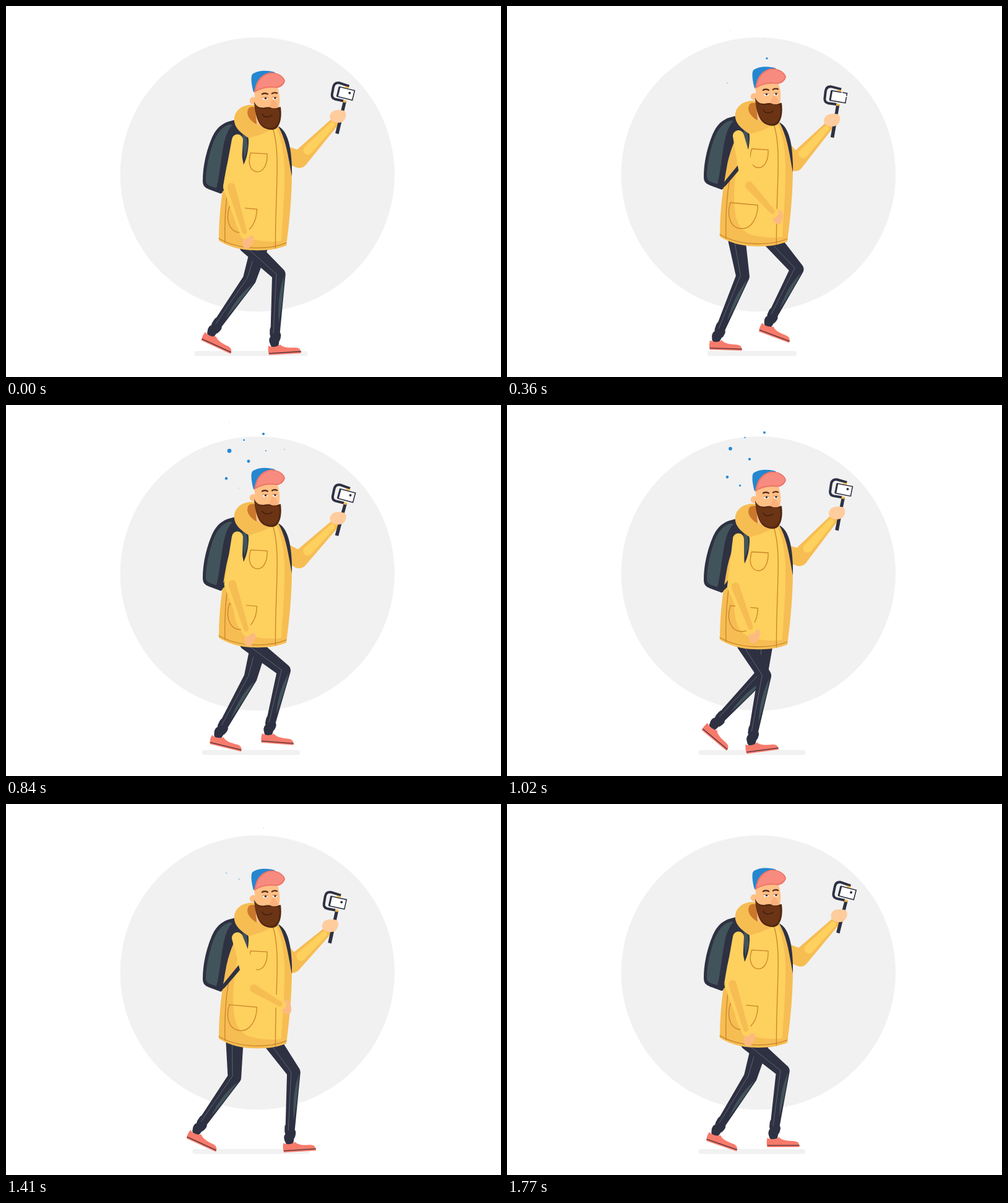
Recreate the animation shown at these times as an HTML page. Size 800x600 px, loop 1800 ms.

```html
<!DOCTYPE html>
<html lang="en">
<head>
<meta charset="utf-8">
<title>Walking vlogger</title>
<style>
  html, body { margin: 0; width: 100%; height: 100%; overflow: hidden; background: #fff; }
  svg { display: block; width: 100vw; height: 100vh; }
  .ink { fill: #2e3142; }
  .teal { fill: #42545b; }
  .sun { fill: #fed05d; }
  .amber { fill: #f6bd53; }
  .skin { fill: #ffc086; }
  .stitch { fill: none; stroke: #c9842a; stroke-width: 1.3; stroke-linecap: round; }
  .seam { fill: none; stroke: #68717b; stroke-width: .8; }
  .bracket { fill: none; stroke: #2e3142; stroke-width: 4; stroke-linejoin: round; }
</style>
</head>
<body>
<svg viewBox="0 0 800 600">
  <defs>
    <g id="shoe">
      <path fill="#f77b6c" d="M-10 3C-4 6 3 6 9 2C14 8 24 8 34 8.500C40 9.500 42 12 42 18H-10C-11.500 12-11 7-10 3Z"/>
      <path d="M-10 15.300H42" stroke="#4a2f38" stroke-width="1.3"/>
    </g>
  </defs>

  <circle cx="406.3" cy="272.5" r="221.7" fill="#f1f1f1"/>
  <rect id="ground" y="558" height="8" rx="4" fill="#f1f1f1"/>
  <g id="dots" fill="#2389d7"></g>

  <path id="farArm" class="amber"/>
  <path id="farLight" class="sun"/>
  <g id="camera">
    <path class="ink" d="M541 151L546 152L534.500 205L529 203.500Z"/>
    <path class="bracket" d="M550 127L534 122Q526 121 524.500 129L522.500 141Q522 147 528 148.500L541 151"/>
    <path d="M534.500 128.500L559 134L555.500 149.500L531 144Z" fill="#fff" stroke="#2e3142" stroke-width="1.6"/>
    <path d="M534.500 128.500L531 144" stroke="#2e3142" stroke-width="3"/>
    <circle class="ink" cx="551" cy="138" r="2"/>
    <path d="M544 127L550 128.500L549.500 131L543.500 129.500ZM541 149.500L546 150.500L545 154L540.500 153Z" fill="#f5b93f"/>
    <path id="flash" d="M0-10L2-2L10 0L2 2L0 10L-2 2L-10 0L-2-2Z" fill="#fff"/>
    <path d="M521 172C524 165 535 165 543 167C548 171 546 181 540 185C533 188 524 186 521 182C519 178 519 175 521 172Z" fill="#ffcc9d"/>
  </g>

  <g id="legB"></g>
  <g id="legA"></g>

  <g id="torso">
    <path class="ink" d="M380 183C356 184 342 192 333 212C324 233 318 258 318 282C318 290 321 293 328 296L347 303L352 300C375 270 392 230 392 212Z"/>
    <path class="teal" d="M362 191C348 194 339 208 333 226C327 245 323 265 323 281C323 287 326 289 331 291L340 294C344 280 347 250 351 228C354 212 358 200 366 192Z"/>
    <path class="amber" d="M384 203C370 212 361 240 356 262C349 300 344 335 344 379C362 390 380 394 400 394.500C420 395.500 438 393 453 387C458 350 462 310 462 268C461 235 455 208 440 194L405 190Z"/>
    <path class="sun" d="M385 203C372 250 364 300 368 335C371 366 385 376 410 379C425 381 440 381 445 379C447 340 451 300 450 262C449 235 446 215 436 194L410 190Z"/>
    <path class="stitch" d="M431 197C437 215 439 245 438 275C437 320 435 350 435.500 391M344 375.500C362 386 382 390 402 390.500C422 391 440 388 453 382.500M360 285C355 315 353 350 354 382"/>
    <path class="stitch" d="M395.500 237L422 238.500C423 255 416 267.500 407 267.500C395 267.500 390 254 395.500 237Z"/>
    <path class="stitch" d="M361 324L405.500 328C405 350 394 366 380 366C362 366 354 347 361 324Z"/>
    <path class="ink" d="M440 194C455 201 463 228 462 275C457 250 454 218 440 194Z"/>
    <path class="ink" d="M346 303L349 293L376 260L378 268L354 296ZM372 186C386 189 393 205 392 222C391 238 388 248 384 256L380 235L377 208Z"/>
    <path class="teal" d="M382 198C390 207 391 222 390 230L385 247L383 225Z"/>
  </g>

  <path id="nearHand" fill="#fdba80" d="M-11-7C-6-11 1-10 8-6C13-3 13 2 9 5C3 9-5 9-10 5Z"/>
  <path id="nearArm" class="sun"/>
  <path id="nearShade" class="amber"/>

  <g id="head">
    <path class="amber" d="M404 160C390 157 372 163 369 180C367 196 380 205 392 213C401 211 414 207 428 200L412 184Z"/>
    <path fill="#cb782c" d="M392 165C387 173 392 184 405 191L408 166C403 162 396 161 392 165Z"/>
    <path class="skin" d="M403 165L405 190L414 194L420 170Z"/>
    <path class="skin" d="M401 133L438 129C442 140 443 150 442 158L440 170L404 168Z"/>
    <circle class="skin" cx="399.500" cy="152.500" r="5.800"/>
    <path fill="#51270f" d="M401 154C404 161 408 164 416 164C424 162 430 163 436 165C440 164 443 162 444 163C446 178 444 192 436 198C429 202 416 199 410 190C405 182 402 170 401 154Z"/>
    <path fill="#6b3415" d="M402 158C406 165 411 166 417 166C428 164 434 167 441 166C443 180 441 190 434 195C427 199 417 196 411 188C406 181 403 170 402 158Z"/>
    <path d="M414 174C417 180 425 180 430 176" fill="none" stroke="#42200f" stroke-width="1.6" stroke-linecap="round"/>
    <path fill="#fbb07c" d="M430 151C434 152 440 157 439 162C437 166 428 166 426 162C426 158 429 156 430 151Z"/>
    <g fill="#fff"><ellipse cx="419" cy="149" rx="4" ry="2.200"/><ellipse cx="434.500" cy="148.500" rx="3.600" ry="2.200"/></g>
    <g fill="#3a2116"><circle cx="419.500" cy="148.600" r="1.800"/><circle cx="435" cy="148.100" r="1.800"/></g>
    <path d="M414.500 147.300H423.500M430.500 146.800H438.500" stroke="#b9784c" stroke-width="1"/>
    <path d="M414 142Q418 139.500 423 142M430 141Q434 138.500 438 140.500" fill="none" stroke="#5a2d18" stroke-width="2.400" stroke-linecap="round"/>
    <path fill="#2487d0" d="M400 139C397 128 395 114 398 110C406 103 425 103 435 107L418 118Z"/>
    <path fill="#ef7568" d="M401 140C403 124 409 112 424 107.500C437 105 450 113 451 121C449 128 443 132 437 132C424 130 410 133 401 140Z"/>
    <path fill="#f88b7f" d="M404 136C406 123 412 114 425 109C437 107 448 114 449 121C446 128 440 130 436 130C424 128 412 131 404 136Z"/>
  </g>
</svg>

<script>
const FRAME = 30, LOOP = 60, STRIDE = 30;
const STANCE = 1.2; // share of the 2 half-turns that a foot spends on the ground
const $ = id => document.getElementById(id);
const put = (el, name, value) => el.setAttribute(name, value);

// Phases count half-turns: one stride is 2.
const wave = (phase, mean, swing, peak = 0, rate = 1) =>
  mean + swing * Math.cos(Math.PI * rate * (phase - peak));
const easeOut = u => 1 - (1 - u) ** 1.5;

// The first step of a stride takes a little longer than the second.
function stridePhase(step) {
  const even = 2 * step / STRIDE;
  return even - .07 * (1 - Math.cos(Math.PI * even));
}

// Point at fraction f of a bone, pushed sideways.
function along([ax, ay], [bx, by], f, side = 0) {
  const dx = bx - ax, dy = by - ay, len = Math.hypot(dx, dy) || 1;
  return [ax + dx * f - dy / len * side, ay + dy * f + dx / len * side];
}

// Tapered bone with round ends.
function bone(a, ra, b, rb) {
  return `M${along(a, b, 0, ra)}L${along(a, b, 1, rb)}A${rb} ${rb} 0 0 0 ${along(a, b, 1, -rb)}` +
    `L${along(a, b, 0, -ra)}A${ra} ${ra} 0 0 0 ${along(a, b, 0, ra)}Z`;
}

// The foot slides back on the ground, then swings forward through the air.
function footPath(phase) {
  if (phase < STANCE) {
    const u = phase / STANCE;
    return [434 - 135 * easeOut(u), 546 - 25 * u * u];
  }
  const v = (phase - STANCE) / (2 - STANCE);
  return [299 + 135 * easeOut(v), 521 + 24 * v - 23 * Math.sin(Math.PI * v)];
}

function drawLeg(id, phase, hipX, shift, lift) {
  const [footX, footY] = footPath(phase);
  const hip = [wave(phase, hipX, 11, 1.9), 386 + lift];
  const knee = [shift + wave(phase, 407, 39, 1.87) + wave(phase, 0, 6, .7, 2),
    lift + wave(phase, 437.5, 6, .75)];
  const ankle = [shift + footX, footY];
  const angle = wave(phase, 13, 24, 1.3) + wave(phase, 0, 4, .35, 2);

  const cuff = (f, side) => {
    const p = along(knee, ankle, f, side);
    return bone(p, 8, along(p, ankle, .3), 8);
  };
  const [shape, shine, seam, shoe] = $(id).children;
  put(shape, "d", bone(hip, 14, knee, 10.8) + bone(knee, 10.8, ankle, 7) +
    cuff(.8, 1) + cuff(.88, -1.5) + cuff(.95, 1));
  put(shine, "d", `M${along(knee, ankle, .02, -8.5)}Q${along(knee, ankle, .3, -9.5)} ${along(knee, ankle, .7, -5)}` +
    `Q${along(knee, ankle, .32, 1)} ${along(knee, ankle, .02, -8.5)}Z`);
  put(seam, "d", `M${along(hip, knee, 0, 4)}L${along(knee, ankle, 0, 4)}L${along(knee, ankle, .85, 3)}`);
  put(shoe, "transform", `translate(${ankle}) rotate(${angle})`);
}

function drawNearArm(phase, lift) {
  const shoulder = [374, 216 + lift];
  const elbow = [wave(phase, 383, 18, 1), lift + wave(phase, 294.5, 2.5, 1)];
  const hand = [wave(phase, 421, 31, 1), wave(phase, 355, 26)];
  const angle = Math.atan2(hand[1] - elbow[1], hand[0] - elbow[0]) * 180 / Math.PI;
  put($("nearArm"), "d", bone(shoulder, 9, elbow, 14) + bone(elbow, 14, along(elbow, hand, .86), 8));
  put($("nearShade"), "d", bone(along(elbow, hand, 0, 1), 6.5, along(elbow, hand, .82), 4));
  put($("nearHand"), "transform", `translate(${hand}) rotate(${angle + 30})`);
}

function drawFarArm(phase, lift, frame) {
  const elbow = [wave(phase, 468.5, 5.5), wave(phase, 253.5, 7, 1.2)];
  const hand = [wave(phase, 530.5, 6.5, -.1), wave(phase, 187.5, 13, 1.25)];
  const wrist = [hand[0] - 7, hand[1] + 11];
  put($("farArm"), "d", bone([448, 238 + lift], 13, elbow, 14) + bone(elbow, 14, wrist, 7.5));
  put($("farLight"), "d", bone(along(elbow, wrist, .25), 7.5, along(elbow, wrist, .95), 4.5));
  put($("camera"), "transform",
    `translate(${hand}) rotate(${wave(phase, .5, 3.5, 1.55)}) translate(-533 -176)`);
  const glow = Math.max(0, 1 - Math.abs(frame - 12) / 3);
  put($("flash"), "transform", `translate(551 139) scale(${glow})`);
}

// Dots rise while they swell and shrink; short lives rise faster.
const dots = [
  [361, 34, 1.2, 20, 21], [416, 46, 2.1, 30, 40], [420, 80, 2.7, 19, 24],
  [356, 118, 2.3, 30, 43], [384.5, 56, 1.4, 29, 24], [361, 73.5, 3.4, 29, 27],
  [450, 77, 1.1, 23, 15], [392, 90.5, 2.5, 29, 27], [376.5, 127.5, 1.8, 38, 24]
].map(([x, y, size, peak, life]) => ({ x, y, size, peak, life }));

function drawDots(frame) {
  dots.forEach(({ x, y, size, peak, life }, i) => {
    const age = (frame - peak) / life;
    const dot = $("dots").children[i];
    put(dot, "cx", x);
    put(dot, "cy", y - 16 * age);
    put(dot, "r", size * Math.max(0, Math.abs(age) < .5 ? Math.cos(Math.PI * age) : 0));
  });
}

function draw(frame) {
  const step = frame % STRIDE;
  const phase = stridePhase(step);
  const lift = wave(phase, -2.3, 3.9, .12, 2);
  const width = wave(2 * step / STRIDE, 155, 35, .1, 2);
  put($("ground"), "x", 395.8 - width / 2);
  put($("ground"), "width", width);
  for (const id of ["torso", "head"]) put($(id), "transform", `translate(0 ${lift})`);
  drawLeg("legA", phase, 380, 0, lift);
  drawLeg("legB", (phase + 1) % 2, 421, 24, lift);
  drawNearArm(phase, lift);
  drawFarArm(phase, lift, frame);
  drawDots(frame);
}

for (const id of ["legA", "legB"]) {
  $(id).innerHTML = '<path class="ink"/><path class="teal"/><path class="seam"/><use href="#shoe"/>';
}
$("dots").innerHTML = "<circle/>".repeat(dots.length);

const start = performance.now();
function tick() {
  draw(Math.floor((performance.now() - start) / FRAME) % LOOP);
  requestAnimationFrame(tick);
}
tick();
</script>
</body>
</html>
```
